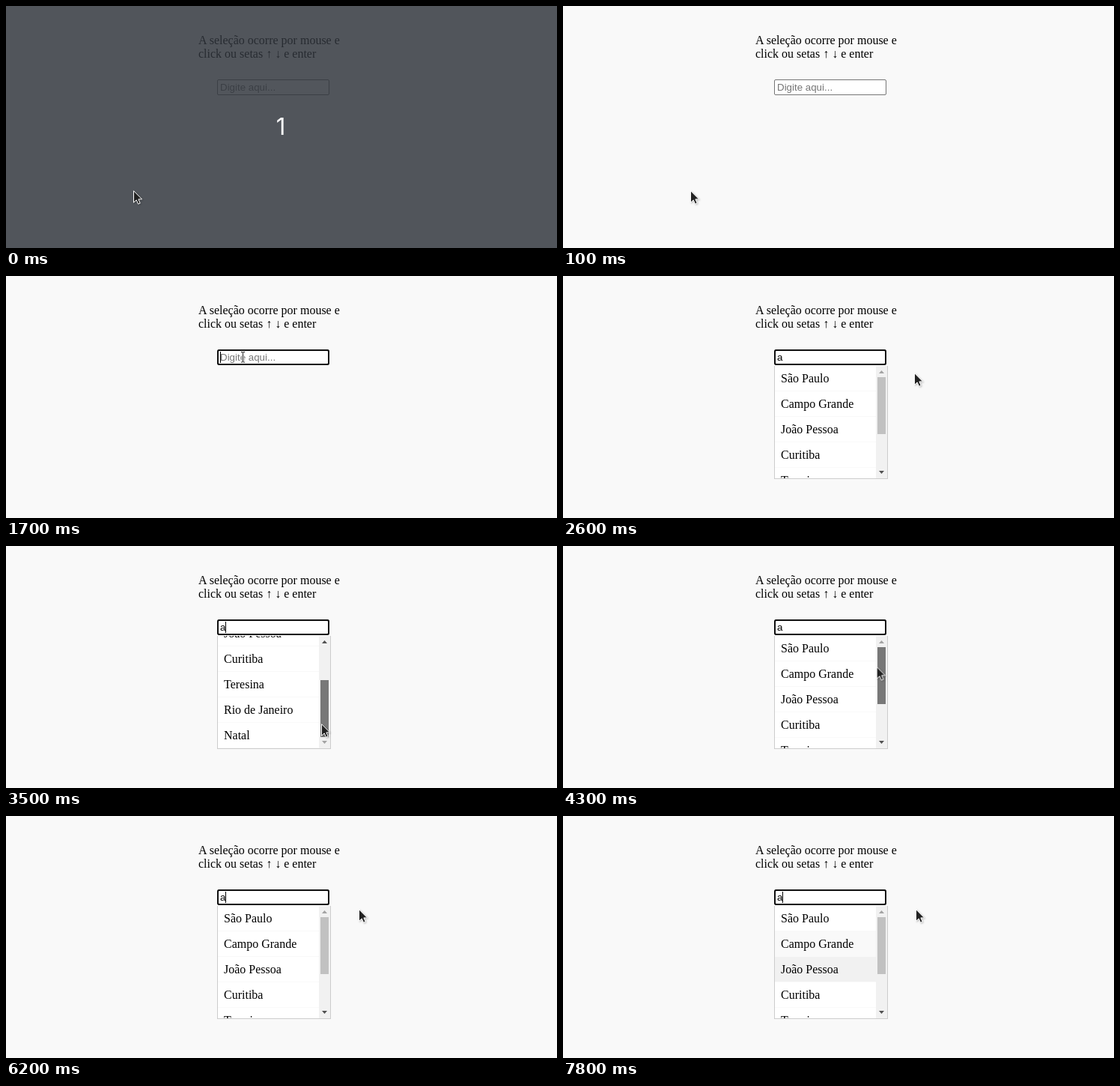
Animation, 736 px wide and 323 px high, one loop 8 s. Source, as an HTML page:

```html
<!DOCTYPE html>
<html lang="pt-BR">
<head>
<meta charset="utf-8">
<title>Autocomplete</title>
<style>
  html, body { margin: 0; width: 100%; height: 100%; overflow: hidden; }
  body {
    position: relative;
    background: #f9f9f9;
    color: #000;
    font: 16px/18px "Liberation Serif", "Times New Roman", serif;
    --dim: #a3a3a3;
    --dark: #505050;
  }
  body *, .anim { box-sizing: border-box; }
  .abs { position: absolute; white-space: nowrap; }
  .anim { animation: 8s step-end infinite; }

  .hint { left: 257px; top: 37px; }

  .field {
    left: 282px; top: 98px; width: 150px; height: 21px;
    background: #fff; border: 1px solid #767676; border-radius: 2px;
  }
  .ring {
    left: 282px; top: 98px; width: 150px; height: 21px;
    border: 2px solid #101010; border-radius: 3px;
    animation-name: focus;
  }
  .value {
    left: 286px; top: 101px;
    font: 13.333px/15px "Liberation Sans", Arial, sans-serif;
  }
  .holder { color: #757575; animation-name: untyped; }
  .typed { animation-name: typed; }
  .caret {
    left: 0; top: 101px; width: 1px; height: 15px; background: #000;
    animation-name: blink, caret-x;
  }

  .list {
    left: 282px; top: 120px; width: 152px; height: 151px;
    background: #fff; border: 1px solid #ccc; border-top: 0; overflow: hidden;
    animation-name: typed;
  }
  .rows { left: 0; top: 0; width: 135px; animation-name: scroll; }
  .rows div { height: 34px; padding: 8px; border-bottom: 1px solid #f9f9f9; }
  .row1 { animation-name: row1; }
  .row2 { animation-name: row2; }
  .row3 { animation-name: row3; }

  .bar { left: 135px; top: 0; width: 15px; height: 150px; background: #f1f1f1; }
  .thumb {
    left: 2px; top: 15px; width: 11px; height: 76px;
    animation-name: thumb, thumb-color;
  }
  .up, .down { left: 4px; width: 7px; height: 4px; }
  .up { top: 6px; clip-path: polygon(50% 0, 100% 100%, 0 100%); animation-name: up; }
  .down { top: 140px; clip-path: polygon(0 0, 100% 0, 50% 100%); animation-name: down; }

  .veil {
    inset: 0; background: rgba(47, 52, 59, .83);
    animation-name: veil;
  }
  .count {
    left: 0; top: 142px; width: 734px; text-align: center;
    color: #fff; font: 31px/38px Inter, Roboto, sans-serif;
  }

  .pointer { left: 0; top: 0; width: 0; height: 0; animation-name: move; }
  .pointer svg { position: absolute; overflow: visible; width: 1px; height: 1px; }
  .arrow { filter: drop-shadow(1px 1px 1px rgba(0, 0, 0, .25)); animation-name: arrow; }
  .beam { animation-name: beam; }

  @keyframes veil { 0% { visibility: visible } 1.25%, 100% { visibility: hidden } }
  @keyframes focus { 0% { visibility: hidden } 18.75%, 100% { visibility: visible } }
  @keyframes untyped { 0% { visibility: visible } 25%, 100% { visibility: hidden } }
  @keyframes typed { 0% { visibility: hidden } 25%, 100% { visibility: visible } }
  @keyframes blink {
    0%, 32.5%, 47.5%, 70%, 85% { opacity: 0 }
    18.75%, 40%, 62.5%, 77.5%, 93.75%, 100% { opacity: 1 }
  }
  @keyframes caret-x {
    0% { transform: translateX(286px) }
    25%, 100% { transform: translateX(293px) }
  }

  @keyframes scroll {
    0% { transform: none }
    38.75% { transform: translateY(0); animation-timing-function: steps(4) }
    43.75% { transform: translateY(-88px) }
    45% { transform: translateY(-88px); animation-timing-function: steps(5) }
    51.25%, 100% { transform: translateY(0) }
  }
  @keyframes thumb {
    0% { transform: none }
    38.75% { transform: translateY(0); animation-timing-function: steps(4) }
    43.75% { transform: translateY(44px) }
    45% { transform: translateY(44px); animation-timing-function: steps(5) }
    51.25%, 100% { transform: translateY(0) }
  }
  @keyframes thumb-color {
    0%, 71.25%, 100% { background: #c1c1c1 }
    37.5%, 68.75% { background: #a8a8a8 }
    40% { background: #787878 }
  }
  @keyframes up {
    0%, 51.25%, 100% { background: var(--dim) }
    40% { background: var(--dark) }
  }
  @keyframes down {
    0%, 46.25%, 100% { background: var(--dark) }
    43.75% { background: var(--dim) }
  }

  @keyframes row1 {
    0%, 71.25%, 97.5%, 100% { background: #fff }
    68.75%, 90% { background: #f1f1f1 }
    96.25% { background: #f9f9f9 }
  }
  @keyframes row2 {
    0% { background: #fff }
    96.25% { background: #f1f1f1 }
    97.5%, 100% { background: #f9f9f9 }
  }
  @keyframes row3 { 0% { background: #fff } 97.5%, 100% { background: #f1f1f1 } }

  @keyframes arrow {
    0%, 23.75%, 100% { visibility: visible }
    17.5% { visibility: hidden }
  }
  @keyframes beam {
    0%, 23.75%, 100% { visibility: hidden }
    17.5% { visibility: visible }
  }
  @keyframes move {
    0% { transform: translate(170px, 246px) }
    3.75% { transform: translate(170px, 246px); animation-timing-function: steps(4) }
    8.75% { transform: translate(280px, 171px) }
    11.25% { transform: translate(280px, 171px); animation-timing-function: steps(5) }
    17.5% { transform: translate(317px, 108px) }
    21.25% { transform: translate(317px, 108px); animation-timing-function: steps(4) }
    26.25% { transform: translate(440px, 150px); animation-timing-function: steps(3) }
    30% { transform: translate(503px, 148px) }
    31.25% { transform: translate(491px, 140px) }
    32.5% { transform: translate(469px, 129px); animation-timing-function: steps(4) }
    37.5% { transform: translate(427px, 188px) }
    38.75% { transform: translate(427px, 188px); animation-timing-function: steps(4) }
    43.75% { transform: translate(421px, 237px) }
    45% { transform: translate(421px, 237px); animation-timing-function: steps(9) }
    56.25% { transform: translate(418px, 139px) }
    61.25% { transform: translate(418px, 139px); animation-timing-function: steps(3) }
    65% { transform: translate(419px, 141px) }
    68.75% { transform: translate(420px, 143px); animation-timing-function: steps(7) }
    77.5%, 100% { transform: translate(471px, 124px) }
  }
</style>
</head>
<body>
  <div class="abs hint">A seleção ocorre por mouse e<br>click ou setas ↑ ↓ e enter</div>

  <div class="abs anim list">
    <div class="abs anim rows">
      <div class="anim row1">São Paulo</div>
      <div class="anim row2">Campo Grande</div>
      <div class="anim row3">João Pessoa</div>
      <div>Curitiba</div>
      <div>Teresina</div>
      <div>Rio de Janeiro</div>
      <div>Natal</div>
    </div>
    <div class="abs bar">
      <div class="abs anim up"></div>
      <div class="abs anim thumb"></div>
      <div class="abs anim down"></div>
    </div>
  </div>

  <div class="abs field"></div>
  <div class="abs anim ring"></div>
  <div class="abs anim value holder">Digite aqui...</div>
  <div class="abs anim value typed">a</div>
  <div class="abs anim caret"></div>

  <div class="abs anim veil"><div class="abs count">1</div></div>

  <div class="abs anim pointer">
    <svg class="anim arrow">
      <path d="M.5 .7V16.3L4.2 12.9 6.6 18.3 9.2 17.2 6.9 11.9H11.6Z" fill="#222" stroke="#fff"/>
    </svg>
    <svg class="anim beam" fill="none">
      <path id="beam" d="M-3 -6.5H-1L-.5 -6 0 -6.5H2M-.5 -6V6.5M-3 7H-1L-.5 6.5 0 7H2" stroke="#fff" stroke-width="2.5"/>
      <path d="M-3 -6.5H-1L-.5 -6 0 -6.5H2M-.5 -6V6.5M-3 7H-1L-.5 6.5 0 7H2" stroke="#222"/>
    </svg>
  </div>
</body>
</html>
```
